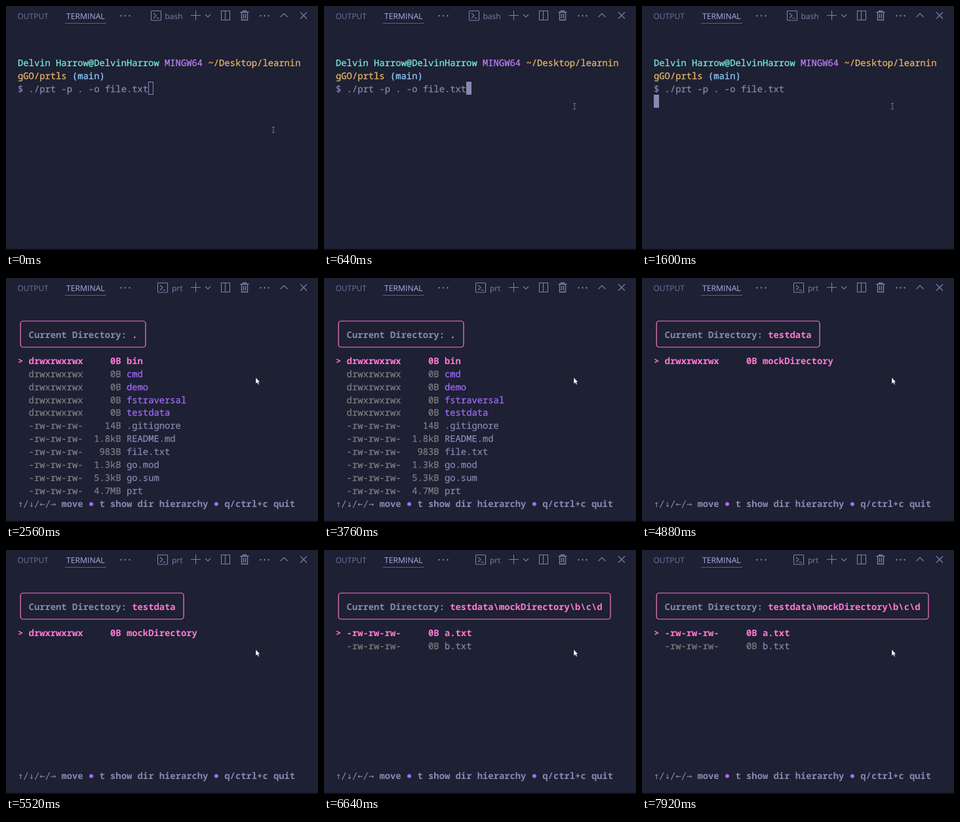
Recreate the animation shown at these times as an HTML page. Size 476x374 px, loop 8 s.

```html
<!DOCTYPE html>
<html lang="en">
<head>
<meta charset="utf-8">
<title>Terminal directory browser</title>
<style>
  html, body { margin: 0; width: 100%; height: 100%; overflow: hidden; background: #1e2033; }
  svg { display: block; width: 476px; height: 374px; }
  text { white-space: pre; text-rendering: geometricPrecision; }
  #screen text { font: 500 13.83px "Noto Sans Mono", monospace; stroke-width: .25; }
  #screen .b { font-weight: 700; stroke-width: 0; }
  #screen .keys { font-family: "DejaVu Sans Mono", monospace; font-weight: 400; stroke-width: 0; }
  .ui { font: 12px "Open Sans", sans-serif; fill: #72749e; }
  .icon { fill: none; stroke: #7e80ad; stroke-width: 1.1; }
  .dots { fill: #7e80ad; }
</style>
</head>
<body>
<svg viewBox="0 0 476 374">
  <rect width="476" height="374" fill="#1e2033"/>
  <rect y="372.5" width="476" height="1.5" fill="#0b0b12"/>

  <text class="ui" x="17.5" y="19.7">OUTPUT</text>
  <text class="ui" x="92" y="19.7" style="font-size:12.2px;fill:#aeb1e2">TERMINAL</text>
  <path d="M90 26.5H153" stroke="#5a5c9c"/>
  <g class="dots">
    <circle cx="175.5" cy="15" r="1.2"/><circle cx="182" cy="15" r="1.2"/><circle cx="188.5" cy="15" r="1.2"/>
    <circle cx="388.5" cy="15" r="1.2"/><circle cx="394.5" cy="15" r="1.2"/><circle cx="400.5" cy="15" r="1.2"/>
  </g>
  <g id="shellIcon" class="icon">
    <rect x="221.5" y="7.5" width="15" height="14.5" rx="1"/>
    <path d="M225 11L229 14.7L225 18.5M229.5 18.5H233.5"/>
  </g>
  <text id="shellName" class="ui" y="19.7" style="fill:#7e80ad"></text>
  <g class="icon">
    <path d="M282 14.5H297M289.5 7V22"/>
    <path d="M304 13L308 17L312 13"/>
    <path d="M328.5 7.5H341.5V21.5H328.5ZM334.5 7.5V21.5"/>
    <path d="M357.5 9.5H370.5M361.5 9.5V7.5H366.5V9.5M359.5 9.5V21.5H368.5V9.5M362.5 12V19M365.5 12V19" stroke-width="1.35"/>
    <path d="M418.5 17L424 11.5L429.5 17"/>
    <path d="M449 9.5L459 19.5M459 9.5L449 19.5"/>
  </g>

  <g id="screen"></g>
  <path id="beam" d="M-2 -4.5H2M0 -4.5V4M-2 4H2" fill="none" stroke="#8f909f" stroke-width=".8"/>
  <path id="arrow" d="M381 152.5V162.3L383.2 160.3L384.8 163.6L386.4 162.9L384.9 159.7H387.7Z" fill="#fff" stroke="#15161f" stroke-width=".5"/>
</svg>
<script>
const LOOP = 8000, LEFT = 18, CELL = 8.298, BASE = 91.9, LINE = 19.93;
const C = {
  fg: "#8689b0", gray: "#7f7e82", pink: "#ff79d2", purple: "#a26bff",
  user: "#78eeda", host: "#c081f6", path: "#e8b868", branch: "#93d0ff"
};
const $ = id => document.getElementById(id);
const col = n => LEFT + n * CELL;
const row = n => BASE + n * LINE;

const put = (c, r, s, color, cls = "") =>
  `<text x="${col(c)}" y="${row(r)}" fill="${color}" stroke="${color}" class="${cls}">${s}</text>`;
const dot = c => `<circle cx="${col(c + .5)}" cy="${row(13) - 4.4}" r="3" fill="${C.purple}"/>`;

// Entries: a trailing slash marks a directory, otherwise "name size".
const DIRS = {
  ".": ["bin/", "cmd/", "demo/", "fstraversal/", "testdata/", ".gitignore 14B", "README.md 1.8kB",
        "file.txt 983B", "go.mod 1.3kB", "go.sum 5.3kB", "prt 4.7MB"],
  "testdata": ["mockDirectory/"],
  "testdata\\mockDirectory": ["a/", "b/"],
  "testdata\\mockDirectory\\b": ["c/", "a.txt 0B"],
  "testdata\\mockDirectory\\b\\c": ["d/"],
  "testdata\\mockDirectory\\b\\c\\d": ["a.txt 0B", "b.txt 0B"]
};

function block(c, r, hollow) {
  const x = Math.round(col(c)), y = 76 + 20 * r;
  return hollow
    ? `<rect x="${x + .5}" y="${y + .5}" width="7" height="19" fill="none" stroke="${C.fg}"/>`
    : `<rect x="${x}" y="${y}" width="8" height="20" fill="${C.fg}"/>`;
}

function shell(cursor) {
  return put(0, 0, "Delvin Harrow@DelvinHarrow", C.user) +
    put(27, 0, "MINGW64", C.host) +
    put(35, 0, "~/Desktop/learnin", C.path) +
    put(0, 1, "gGO/prtls", C.path) +
    put(10, 1, "(main)", C.branch) +
    put(0, 2, "$ ./prt -p . -o file.txt", C.fg) +
    (cursor === "run" ? block(0, 3) : block(24, 2, cursor === "idle"));
}

function entry(item, i, selected) {
  const isDir = item.endsWith("/");
  const [name, size] = isDir ? [item.slice(0, -1), "0B"] : item.split(" ");
  const r = i + 2, on = i === selected, cls = on ? "b" : "";
  const meta = on ? C.pink : C.gray;
  return (on ? put(0, r, "&gt;", C.pink, cls) : "") +
    put(2, r, isDir ? "drwxrwxrwx" : "-rw-rw-rw-", meta, cls) +
    put(19 - size.length, r, size, meta, cls) +
    put(20, r, name, on ? C.pink : isDir ? C.purple : C.fg, cls);
}

function browser(dir, selected) {
  const x = col(.5), width = (22 + dir.length) * CELL;
  return `<rect x="${x}" y="66" width="${width}" height="40" rx="4" fill="none" stroke="${C.pink}" stroke-width="1.2"/>` +
    put(2, 0, "Current Directory:", C.fg, "b") +
    put(21, 0, dir, C.pink, "b") +
    DIRS[dir].map((item, i) => entry(item, i, selected)).join("") +
    put(0, 13, "↑/↓/←/→", C.fg, "keys") +
    put(8, 13, "move", C.fg, "b") + dot(13) +
    put(15, 13, "t show dir hierarchy", C.fg, "b") + dot(36) +
    put(38, 13, "q/ctrl+c quit", C.fg, "b");
}

const MOCK = "testdata\\mockDirectory";
const STEPS = [
  [0, shell, "idle"], [560, shell, "focus"], [1520, shell, "run"],
  [1760, browser, ".", 0], [3920, browser, ".", 1], [4480, browser, ".", 2],
  [4560, browser, ".", 3], [4640, browser, ".", 4],
  [4800, browser, "testdata", 0],
  [5600, browser, MOCK, 0], [5760, browser, MOCK, 1],
  [5920, browser, MOCK + "\\b", 0],
  [6240, browser, MOCK + "\\b\\c", 0],
  [6640, browser, MOCK + "\\b\\c\\d", 0]
];

let shown = null;
function draw(t) {
  const step = STEPS.findLast(s => s[0] <= t);
  if (step !== shown) {
    shown = step;
    $("screen").innerHTML = step[1](...step.slice(2));
  }

  const inBrowser = step[1] === browser;
  $("beam").style.display = inBrowser ? "none" : "";
  $("arrow").style.display = inBrowser ? "" : "none";
  const p = Math.min(1, Math.max(0, (t - 40) / 480));
  const k = p * p * (3 - 2 * p);
  $("beam").setAttribute("transform", `translate(${408 - 26 * k} ${190 - 36 * k})`);

  const renamed = t >= 2560;
  $("shellName").textContent = renamed ? "prt" : "bash";
  $("shellName").setAttribute("x", renamed ? 253 : 242.5);
  $("shellIcon").setAttribute("transform", `translate(${renamed ? 10 : 0} 0)`);
}

function tick() {
  draw(performance.now() % LOOP);
  requestAnimationFrame(tick);
}
tick();
</script>
</body>
</html>
```
